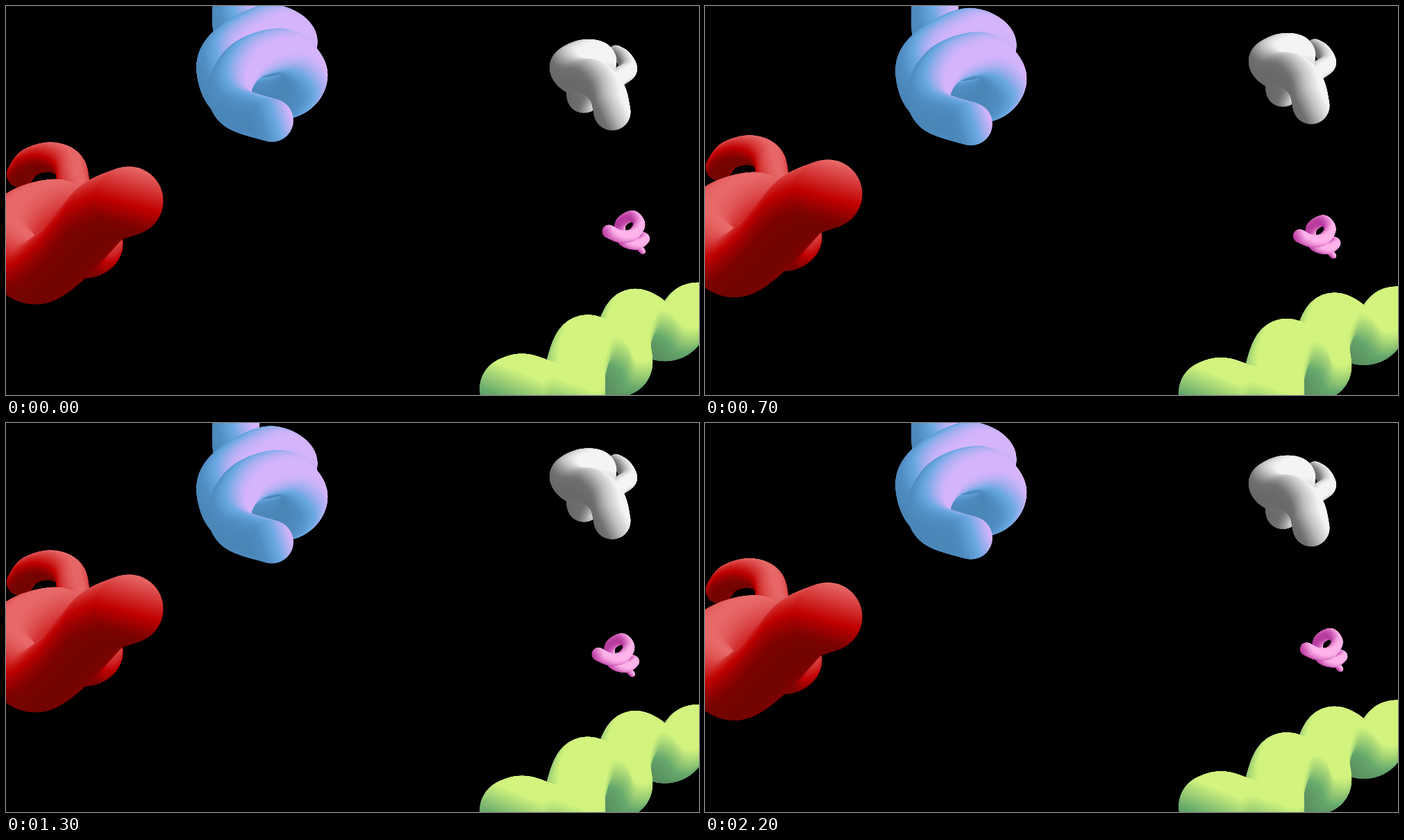
An HTML page with a canvas that plays this animation: 998x561 px, repeating every 2400 ms.

```html
<!DOCTYPE html>
<html lang="en">
<head>
<meta charset="utf-8">
<title>Floating coils</title>
<style>
  html, body { margin: 0; width: 100%; height: 100%; overflow: hidden; background: #000; }
  canvas { display: block; }
</style>
</head>
<body>
<canvas id="stage" width="998" height="561"></canvas>
<script>
const ctx = document.getElementById('stage').getContext('2d');
const LOOP = 2400, STEP = 100, STAMPS = 28;

// Each coil is one shaded disc swept along a spline, from back to front.
// Radii are spread evenly over the sweep; drift is the shift per step.
const coils = [
  {
    spine: [[334, -45], [335, 45], [390, 82], [415, 50], [378, 31], [323, 59], [307, 92], [330, 134],
      [408, 129], [431, 97], [400, 65], [348, 78], [323, 115], [332, 147], [383, 165]],
    radii: [34, 31],
    colors: { 0: '#4a85b7', 0.25: '#4f8dc3', 0.56: '#69a8e2', 0.95: '#d4b4fb' },
    angle: -17, drift: [0, 0.73]
  },
  {
    spine: [[20, 243], [35, 225], [66, 218], [92, 232], [102, 275], [139, 340], [112, 358], [88, 315],
      [75, 294], [28, 306], [-4, 340], [12, 366], [45, 383], [88, 352], [115, 322], [140, 296], [177, 281]],
    radii: [19, 24, 44, 47, 49.5],
    colors: { 0: '#720400', 0.15: '#7c0300', 0.45: '#c00000', 1: '#e86a6a' },
    angle: -75, drift: [0, -1.44]
  },
  {
    spine: [[878, 67], [890, 76], [896, 92], [880, 104], [842, 133], [829, 132], [835, 112], [853, 80],
      [832, 75], [810, 87], [821, 101], [847, 105], [866, 125], [873, 153]],
    radii: [10.5, 14, 26, 27, 26.5],
    colors: { 0: '#686868', 0.2: '#707070', 0.55: '#bdbdbd', 0.9: '#f4f4f4' },
    angle: -25, drift: [0, -1.29]
  },
  {
    spine: [[917, 354], [908, 342], [914, 332], [920, 336], [907, 344], [888, 337],
      [885, 314], [902, 303], [912, 315], [902, 330], [884, 332], [868, 325]],
    radii: [3.8, 7.5, 8, 9.5],
    colors: { 0: '#b5379b', 0.4: '#d463bd', 0.9: '#ffb3ea' },
    angle: -25, drift: [-1.67, 0.93]
  },
  {
    spine: [[1020, 440], [988, 438], [964, 469], [940, 472], [920, 453], [901, 450], [888, 484], [889, 518],
      [866, 520], [853, 496], [833, 490], [820, 525], [815, 565], [775, 556], [745, 547], [728, 552]],
    radii: [37, 46],
    colors: { 0: '#578a5d', 0.32: '#66a86c', 0.8: '#d2f47e' },
    angle: -68, drift: [0, 0.8]
  }
];

function spline(a, b, c, d, u) {
  return b + u / 2 * (c - a + u * (2 * a - 5 * b + 4 * c - d + u * (3 * (b - c) + d - a)));
}

function mix(list, u) {
  const at = u * (list.length - 1), i = Math.min(Math.floor(at), list.length - 2);
  return list[i] + (list[i + 1] - list[i]) * (at - i);
}

// Gradient on the unit disc, dark to light along the given angle.
function shade(angle, colors) {
  const x = Math.cos(angle * Math.PI / 180), y = Math.sin(angle * Math.PI / 180);
  const gradient = ctx.createLinearGradient(-x, -y, x, y);
  for (const at in colors) gradient.addColorStop(+at, colors[at]);
  return gradient;
}

function sweep(spine, radii) {
  const last = spine.length - 1, total = last * STAMPS;
  const key = (i, axis) => spine[Math.max(0, Math.min(last, i))][axis];
  return Array.from({ length: total + 1 }, (_, n) => {
    const i = Math.floor(n / STAMPS), u = n / STAMPS - i;
    const along = axis => spline(key(i - 1, axis), key(i, axis), key(i + 1, axis), key(i + 2, axis), u);
    return { x: along(0), y: along(1), r: mix(radii, n / total) };
  });
}

for (const coil of coils) {
  coil.discs = sweep(coil.spine, coil.radii);
  coil.fill = shade(coil.angle, coil.colors);
}

// Out for eleven steps and back again; the last two positions hold twice as long.
function position(ms) {
  const step = Math.floor(ms % LOOP / STEP);
  if (step <= 11) return step;
  if (step <= 20) return 22 - step;
  return step < 22 ? 2 : 1;
}

function draw(pos) {
  ctx.setTransform(1, 0, 0, 1, 0, 0);
  ctx.fillStyle = '#000';
  ctx.fillRect(0, 0, 998, 561);
  for (const { discs, fill, drift } of coils) {
    ctx.fillStyle = fill;
    for (const { x, y, r } of discs) {
      ctx.setTransform(r, 0, 0, r, x + drift[0] * pos, y + drift[1] * pos);
      ctx.beginPath();
      ctx.arc(0, 0, 1, 0, 2 * Math.PI);
      ctx.fill();
    }
  }
}

let shown = 0;
const start = performance.now();
draw(shown);

function tick() {
  const pos = position(performance.now() - start);
  if (pos !== shown) draw(shown = pos);
  requestAnimationFrame(tick);
}
requestAnimationFrame(tick);
</script>
</body>
</html>
```
